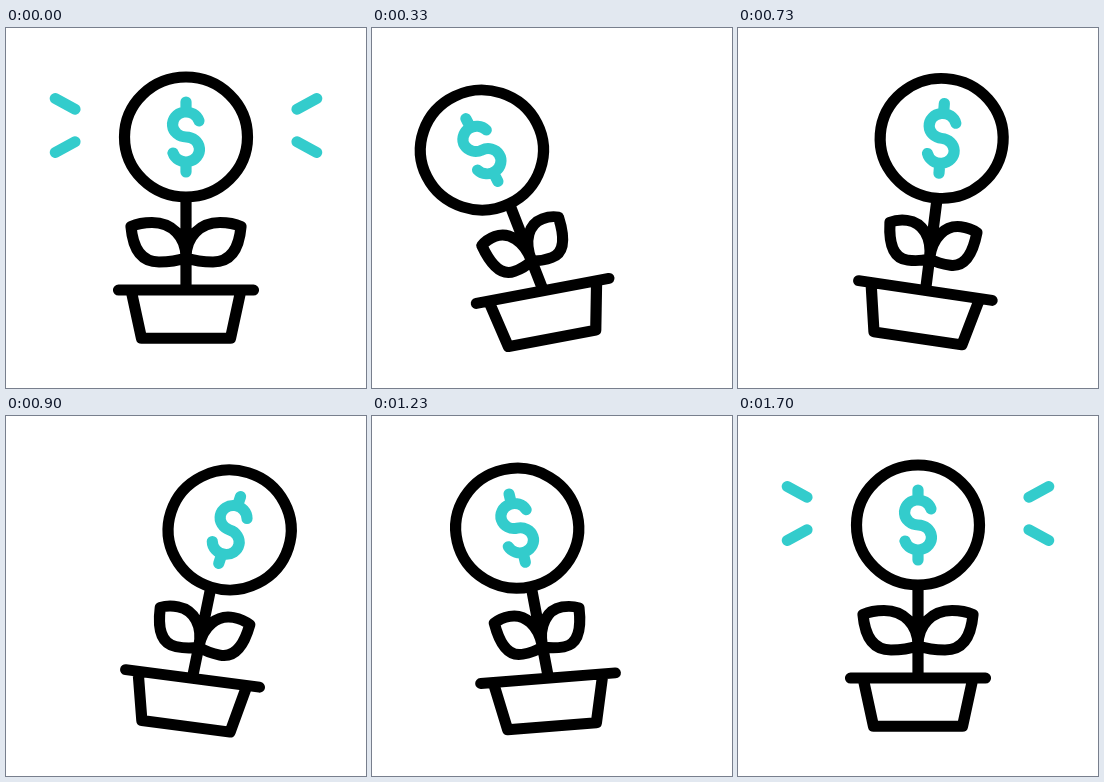
An HTML page with a canvas for the animation above (2 s loop, 360 px wide and 360 px high).

```html
<!DOCTYPE html>
<html lang="en">
<head>
<meta charset="utf-8">
<title>Swaying money plant</title>
<style>
html, body { margin: 0; overflow: hidden; background: #fff; }
canvas { display: block; width: 360px; height: 360px; }
</style>
</head>
<body>
<canvas id="stage"></canvas>
<script>
const canvas = document.getElementById('stage');
const ctx = canvas.getContext('2d');
const ratio = window.devicePixelRatio || 1;
canvas.width = canvas.height = 360 * ratio;

const LOOP = 2000, STEP = 100 / 3;
const INK = '#000', TEAL = '#33cccc';
const SQUASH = .975; // the whole drawing is slightly flattened
const POT = 53.3, STEM = 90.3, RADIUS = 61.5, NECK = 62.6;

// Each part is drawn upwards from its own pivot.
const pot = new Path2D('M-67.5 -49.2H67.5M-54.5 -47L-44.5 .3H44.5L54.5 -47');
const leaf = new Path2D('M0 -29.8C0 -50.3 -14 -65.2 -34 -65.2Q-46 -65.2 -55 -61.1' +
  'Q-52 -24.7 -27 -24.7Q-12 -24.7 0 -28.7Z');
const halfDollar = new Path2D('M0 -36V-25.6M13 -16.4A13.5 12.8 0 1 0 0 0');

function ease(u) {
  u = Math.min(1, Math.max(0, u));
  return u * u * (3 - 2 * u);
}

// Leaves 0 at time 0, passes the peaks at equal gaps and comes to rest at 0.
function swing(t, first, gap, ...peaks) {
  let value = peaks[0] * ease(t / first);
  peaks.forEach((peak, i) => {
    const next = peaks[i + 1] || 0;
    value += (next - peak) * ease((t - first - i * gap) / gap);
  });
  return value;
}

function pivot(y, degrees) {
  ctx.translate(0, y);
  ctx.rotate(degrees * Math.PI / 180);
}

function stroke(path, color = INK) {
  ctx.strokeStyle = color;
  ctx.lineWidth = 11.2;
  ctx.stroke(path);
}

function drawRays(length) {
  if (length <= 0) return;
  const rays = new Path2D();
  for (const side of [-1, 1]) {
    for (const v of [-1, 1]) {
      rays.moveTo(side * 111, v * 16.7 - 218);
      rays.lineTo(side * (111 + 19.7 * length), v * (16.7 + 11 * length) - 218);
    }
  }
  stroke(rays, TEAL);
}

function drawStem(spread) {
  const path = new Path2D(`M0 0V${-STEM}`);
  for (const side of [1, -1]) path.addPath(leaf, new DOMMatrix([side * spread, 0, 0, 1, 0, 0]));
  stroke(path);
}

function drawCoin() {
  const ring = new Path2D(), dollar = new Path2D();
  ring.arc(0, -NECK, RADIUS, 0, 2 * Math.PI);
  for (const s of [1, -1]) dollar.addPath(halfDollar, new DOMMatrix([s, 0, 0, s, 0, -NECK]));
  stroke(ring);
  stroke(dollar, TEAL);
}

function draw(t) {
  ctx.setTransform(ratio, 0, 0, ratio, 0, 0);
  ctx.fillStyle = '#fff';
  ctx.fillRect(0, 0, 360, 360);
  ctx.lineCap = ctx.lineJoin = 'round';
  ctx.translate(180, 310);
  ctx.scale(1, SQUASH);
  drawRays(ease((Math.abs(t - 850) - 610) / 240));
  pivot(0, swing(t, 455, 345, -13.3, 11, -5.5));
  stroke(pot);
  pivot(-POT, swing(t, 520, 340, -14, 4, -6));
  drawStem(1 - swing(t, 230, 285, 0, .85, .1, .35, .1));
  pivot(-STEM, swing(t, 575, 370, -9, 7, -4));
  drawCoin();
}

// The motion advances at 30 steps per second.
function tick() {
  const t = performance.now() % LOOP;
  draw(Math.floor((t + 4) / STEP) * STEP % LOOP);
  requestAnimationFrame(tick);
}
tick();
</script>
</body>
</html>
```
